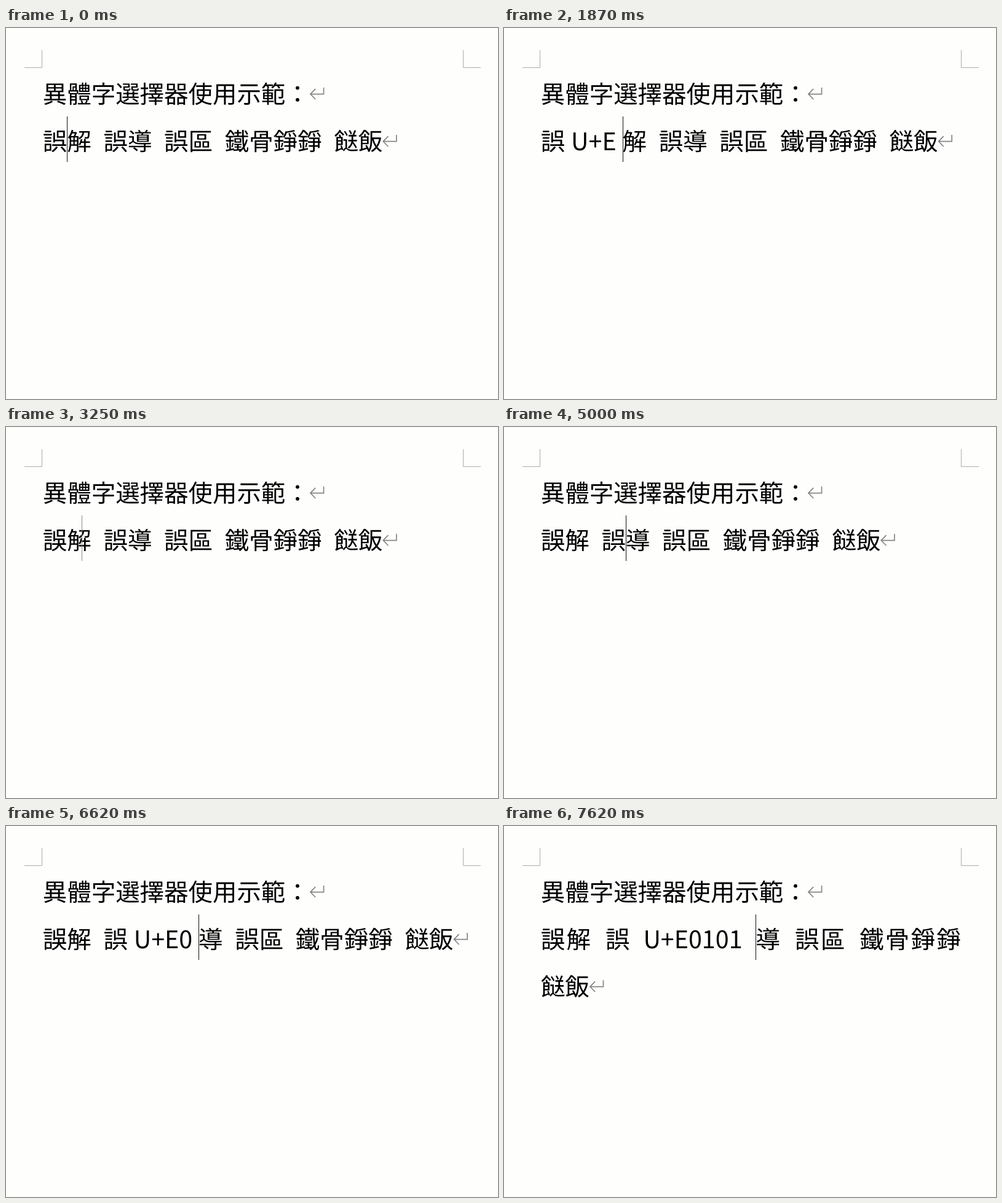
An HTML page that plays this animation: 800x604 px, repeating every 8000 ms.

```html
<!DOCTYPE html>
<html lang="ja">
<head>
<meta charset="utf-8">
<title>異體字選擇器使用示範</title>
<style>
html, body { margin: 0; width: 100%; height: 100%; overflow: hidden; background: #fefefd; }
svg { display: block; width: 800px; height: 604px; }
text {
  font: 39.45px "Noto Sans CJK JP", "Noto Sans CJK TC", "Noto Sans CJK", sans-serif;
  fill: #000;
  text-rendering: geometricPrecision;
  white-space: pre;
}
.mark { fill: none; stroke: #858585; stroke-width: 1.7; }
.crop { fill: none; stroke: #acacac; stroke-width: 1; }
</style>
</head>
<body>
<svg viewBox="0 0 800 604">
  <path class="crop" d="M58.5 36V64.5H30M743.5 36V64.5H772"/>
  <g id="title"></g>
  <g id="body"></g>
  <rect id="caret" y="144" width="1" height="74"/>
</svg>
<script>
const EM = 39.45, LEFT = 59.8, RIGHT = 742.6, LINE = 77, BASE = 122.3;
const LOOP = 8000;
const TITLE = '異體字選擇器使用示範：';
const TEXT = '誤解 誤導 誤區 鐵骨錚錚 餸飯';
const SELECTOR = '\u{E0101}';
const CONVERTED = 3250;
const WIDTHS = { ' ': .5, U: .721, E: .589, '+': .555, 0: .555, 1: .555 };

// time, insertion point, typed text, caret progress (0 = hidden)
const STEPS = [
  [0, 1, '', 1], [370, 1, '', 0],
  [750, 1, 'U', .88], [870, 1, 'U', 1],
  [1370, 1, 'U+', .88], [1500, 1, 'U+', 1],
  [1750, 1, 'U+E', .88], [1870, 1, 'U+E', 1],
  [2000, 1, 'U+E0', .88], [2120, 1, 'U+E0', 1],
  [2250, 1, 'U+E01', 1], [2370, 1, 'U+E010', 1],
  [2500, 1, 'U+E0101', 1], [3000, 1, 'U+E0101', 0],
  [3250, 1, '', .886], [3370, 1, '', 1], [3870, 1, '', 0],
  [4370, 2, '', .88], [4500, 2, '', 1], [4620, 3, '', 1],
  [4870, 4, '', .88], [5000, 4, '', 1], [5500, 4, '', 0],
  [5620, 4, 'U', .88], [5750, 4, 'U', 1],
  [6250, 4, 'U+', 1],
  [6370, 4, 'U+E', .88], [6500, 4, 'U+E', 1],
  [6620, 4, 'U+E0', 1], [6750, 4, 'U+E01', 1],
  [7000, 4, 'U+E010', 1],
  [7500, 4, 'U+E0101', .88], [7620, 4, 'U+E0101', 1]
];

const $ = id => document.getElementById(id);
const isHan = c => c > '\u2e80';
const isWord = c => /[A-Z0-9]/.test(c);
const width = c => (WIDTHS[c] || 1) * EM;

// Kind of the joint between two neighbours
function joint(a, b) {
  if (!a || !b) return '';
  if (isHan(a) && isWord(b) || isWord(a) && isHan(b)) return 'auto';
  if (isHan(a) && isHan(b)) return 'han';
  return a === ' ' || b === ' ' ? 'space' : '';
}

function measure(chars) {
  const count = { auto: 0, han: 0, space: 0, '': 0 };
  let size = 0;
  chars.forEach((c, i) => {
    size += width(c);
    count[joint(c, chars[i + 1])]++;
  });
  return { size: size + count.auto * EM / 4, count };
}

// Left edges of all characters on one line, and its right end
function place(chars, justify) {
  const { size, count } = measure(chars);
  const extra = RIGHT - LEFT - size;
  let auto = EM / 4, each = 0;
  if (count.auto && (justify || extra < 0)) {
    const grow = Math.min(extra / count.auto, EM / 4);
    each = (extra - grow * count.auto) / (count.auto + count.han + count.space);
    auto += grow + each;
  }
  let x = LEFT;
  const xs = chars.map((c, i) => {
    const kind = joint(c, chars[i + 1]), at = x;
    x += width(c) + (kind === 'auto' ? auto : kind ? each : 0);
    return at;
  });
  return { xs, end: x };
}

function breakAt(chars) {
  for (let n = chars.length; n > 0; n--) {
    const part = chars.slice(0, chars[n - 1] === ' ' ? n - 1 : n);
    const { size, count } = measure(part);
    if (size - count.auto * EM / 8 <= RIGHT - LEFT) return n;
  }
}

const markAt = (x, y) =>
  `<path class="mark" d="M${x + 22.8} ${y - 25.3}v10.6H${x + 1.2}m8.2-8.4l-8.2 8.4l8.2 8.4"/>`;

function draw(chars, { xs }, y, glyph = c => c) {
  const spans = chars.map((c, i) =>
    c === ' ' ? '' : `<tspan x="${xs[i].toFixed(2)}">${glyph(c, i)}</tspan>`);
  return `<text y="${y}">${spans.join('')}</text>`;
}

function layout([time, pos, typed]) {
  const chars = [...TEXT.slice(0, pos), ...typed, ...TEXT.slice(pos)];
  const cut = breakAt(chars), wraps = cut < chars.length;
  const first = chars.slice(0, cut), rest = chars.slice(cut);
  if (wraps && first[cut - 1] === ' ') first.pop();
  const top = place(first, wraps);
  const glyph = (c, i) => i === 0 && time >= CONVERTED ? c + SELECTOR : c;
  let svg = draw(first, top, BASE + LINE, glyph);
  if (wraps) {
    const low = place(rest, false);
    svg += draw(rest, low, BASE + 2 * LINE) + markAt(low.end, BASE + 2 * LINE);
  } else {
    svg += markAt(top.end, BASE + LINE);
  }
  return { svg, x: top.xs[pos + typed.length] };
}

let restX = null;
const scenes = STEPS.map((step, i) => {
  const { svg, x } = layout(step);
  const k = step[3], from = restX === null ? x : restX;
  if (k === 0 || k === 1) restX = x;
  return { svg, moving: k > 0 && k < 1, shown: k > 0, caret: Math.round(from + (x - from) * (k || 1)) };
});

const title = [...TITLE];
const head = place(title, false);
$('title').innerHTML = draw(title, head, BASE) + markAt(head.end, BASE);

let current = -1;
const start = performance.now();
function tick() {
  const t = Math.max(0, performance.now() - start) % LOOP;
  let i = STEPS.length - 1;
  while (STEPS[i][0] > t) i--;
  if (i !== current) {
    current = i;
    const s = scenes[i], caret = $('caret');
    $('body').innerHTML = s.svg;
    caret.setAttribute('x', s.caret);
    caret.setAttribute('fill', s.moving ? '#8c8c8c' : '#111');
    caret.setAttribute('visibility', s.shown ? 'visible' : 'hidden');
  }
  requestAnimationFrame(tick);
}
tick();
</script>
</body>
</html>
```
